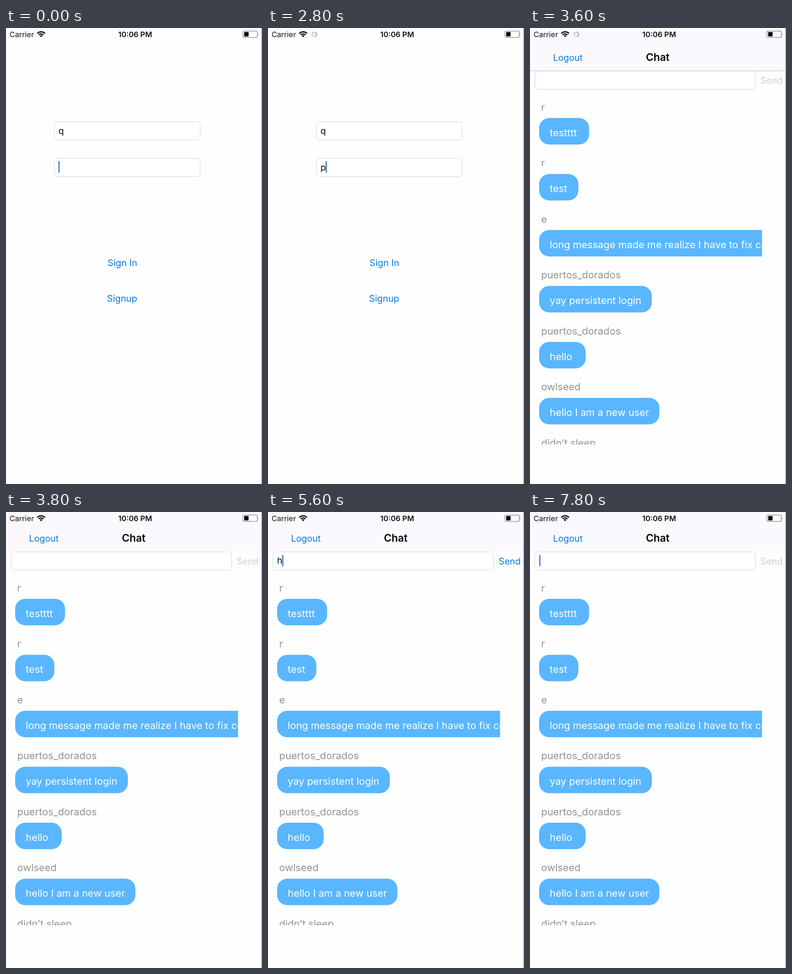
Write an HTML page that moves like this. It is 561 px wide and 998 px high and loops after 8000 ms.

```html
<!DOCTYPE html>
<html lang="en">
<head>
<meta charset="utf-8">
<title>Chat sign-in</title>
<style>
  html, body { margin: 0; width: 100%; height: 100%; overflow: hidden; background: #fefefe; }
  svg { display: block; width: 561px; height: 998px; font-family: Inter, Roboto, sans-serif; }
  .btn { font-size: 20.2px; fill: #0a7be4; }
  .nav { font-size: 19.7px; }
  .send { font-size: 20px; }
  .off { fill: #d0d0d0; }
  .input { font-size: 19.2px; fill: #0a0a0a; }
  .title { font-size: 22.8px; font-weight: 600; }
  .status { font-size: 16.4px; fill: #111; }
  .clock { font-weight: 600; text-anchor: middle; }
  .name { font-size: 21.9px; fill: #939393; }
  .msg { font-size: 21.8px; fill: #fdfeff; }
  .bubble { fill: #59b6ff; }
  .field { fill: #fff; stroke: #e2e2e2; stroke-width: 1.4; }
  .caret { fill: #426be0; }
</style>
</head>
<body>
<svg id="stage" viewBox="0 0 561 998"></svg>
<script>
const LOOP = 8000, TICK = 200;

// [time, what changes from then on]
const steps = [
  [0, { pass: '', draft: '', caret: 1, signup: 1, send: 1, slide: 998, loaded: 0 }],
  [600, { caret: 0 }],
  [1000, { caret: 1 }],
  [1400, { pass: 'p' }],
  [2000, { caret: 0 }],
  [2400, { caret: 1 }],
  [2600, { signup: 0.2 }],
  [2800, { signup: 1 }],
  [3200, { slide: 780, caret: 0 }],
  [3400, { slide: 100 }],
  [3600, { slide: 7, loaded: 1 }],
  [3800, { slide: 0 }],
  [5000, { caret: 1 }],
  [5600, { draft: 'h' }],
  [6000, { draft: 'he' }],
  [6200, { draft: 'hel' }],
  [6400, { draft: 'hell' }],
  [6600, { draft: 'hello' }],
  [7000, { caret: 0 }],
  [7400, { caret: 1 }],
  [7600, { send: 0.2 }],
  [7800, { draft: '', send: 1 }]
];

// sender, message, right edge of the bubble
const messages = [
  ['r', 'testttt', 129.5],
  ['r', 'test', 106],
  ['e', 'long message made me realize I have to fix constraints', 560],
  ['puertos_dorados', 'yay persistent login', 267],
  ['puertos_dorados', 'hello', 122],
  ['owlseed', 'hello I am a new user', 283.5],
  ['didn’t sleep', '', 106]
];

const text = (x, y, cls, str, id = '') =>
  `<text x="${x}" y="${y}" class="${cls}" id="${id}">${str}</text>`;
const rect = (x, y, w, h, attrs) =>
  `<rect x="${x}" y="${y}" width="${w}" height="${h}" ${attrs}/>`;
const field = (x, y, w) => rect(x, y, w, 40, 'rx="7" class="field"');
const caret = (x, y, id) => rect(x, y, 2.5, 25, `class="caret" id="${id}"`);

const row = ([name, msg, right], i) => {
  const top = 190 + 122.5 * i;
  return text(24.5, top - 16.5, 'name', name) +
    rect(20, top, right - 20, 58, 'rx="22" class="bubble"') +
    text(43.3, top + 39.5, 'msg', msg);
};

const arc = r => {
  const dx = r * Math.sin(0.82), y = 20 - r * Math.cos(0.82);
  return `M${77 - dx} ${y}A${r} ${r} 0 0 1 ${77 + dx} ${y}`;
};
const wifi = `<path d="${arc(11.6)}${arc(7.2)}" fill="none" stroke="#111" stroke-width="2.7"/>
  <path d="${arc(4.2)}L77 20Z" fill="#111"/>`;

const battery = rect(519.4, 6.6, 31.4, 14, 'rx="3" fill="none" stroke="#858585" stroke-width="1.3"') +
  rect(522, 8.8, 9.6, 9.6, 'rx="1" fill="#050505"') +
  '<path d="M552.4 11.3q2.2 2.3 0 4.6z" fill="#858585"/>';

const spokes = Array.from({ length: 8 }, (_, i) =>
  `<path d="M0-3.2V-6.6" transform="rotate(${i * 45})" stroke-opacity="${0.25 + i * 0.07}"/>`).join('');

const stage = document.getElementById('stage');
stage.innerHTML = `
  <clipPath id="list"><rect y="127" width="508.5" height="777.5"/></clipPath>
  <g>
    ${field(106, 205, 319.5)}${text(115, 231.5, 'input', 'q')}
    ${field(106, 285, 319.5)}${text(115, 311.5, 'input', '', 'pass')}
    ${caret(115, 291.5, 'passCaret')}
    ${text(222.5, 521, 'btn', 'Sign In')}
    ${text(221.2, 598.5, 'btn', 'Signup', 'signup')}
  </g>
  <g id="chat">
    ${rect(0, 0, 561, 998, 'fill="#fefefe"')}
    ${rect(0, 0, 561, 86.3, 'fill="#fbf9fd"')}
    ${rect(0, 86.2, 561, 1.2, 'fill="#c3c1c5" id="rule"')}
    ${text(50.5, 64.5, 'btn nav', 'Logout')}
    ${text(254, 65.3, 'title', 'Chat')}
    ${field(11.2, 87.2, 483)}
    ${text(20, 113.3, 'input', '', 'draft')}
    ${caret(20.3, 94, 'draftCaret')}
    ${text(505.3, 114.5, 'btn send', 'Send', 'send')}
    <g id="rows" clip-path="url(#list)">${messages.map(row).join('')}</g>
  </g>
  ${text(7.7, 20, 'status', 'Carrier')}${wifi}
  <g id="spinner" stroke="#333" stroke-width="1.7">${spokes}</g>
  ${text(283, 20, 'status clock', '10:06 PM')}${battery}
  ${rect(559, 0, 2, 998, 'fill="#82f25e"')}`;

const el = id => document.getElementById(id);
const show = (id, on) => el(id).setAttribute('visibility', on ? 'visible' : 'hidden');

function type(id, str, x, on) {
  const node = el(id);
  if (node.textContent !== str) node.textContent = str;
  const width = str ? node.getComputedTextLength() : 0;
  el(id + 'Caret').setAttribute('x', x + width * 0.95);
  show(id + 'Caret', on);
}

// The app polls once a second; signing up keeps the network busy longer.
const busy = t => (t % 1000 >= 200 && t % 1000 < 600) || (t >= 2800 && t < 3800);

function draw(time) {
  const t = Math.floor(time % LOOP / TICK) * TICK;
  const s = Object.assign({}, ...steps.filter(([at]) => at <= t).map(([, change]) => change));
  const inChat = s.slide < 998;

  type('pass', s.pass, 115, s.caret && !inChat);
  type('draft', s.draft, 20.3, s.caret && inChat);
  el('signup').setAttribute('opacity', s.signup);
  el('send').setAttribute('opacity', s.send);
  el('send').classList.toggle('off', !s.draft);

  el('chat').setAttribute('transform', `translate(0 ${s.slide})`);
  show('chat', inChat);
  show('rows', inChat && s.loaded);
  show('rule', inChat && s.loaded && s.slide > 0);

  show('spinner', busy(t));
  el('spinner').setAttribute('transform', `translate(101.6 14) rotate(${t / TICK * 90})`);
}

function loop(now) {
  draw(now);
  requestAnimationFrame(loop);
}
draw(0);
requestAnimationFrame(loop);
</script>
</body>
</html>
```
